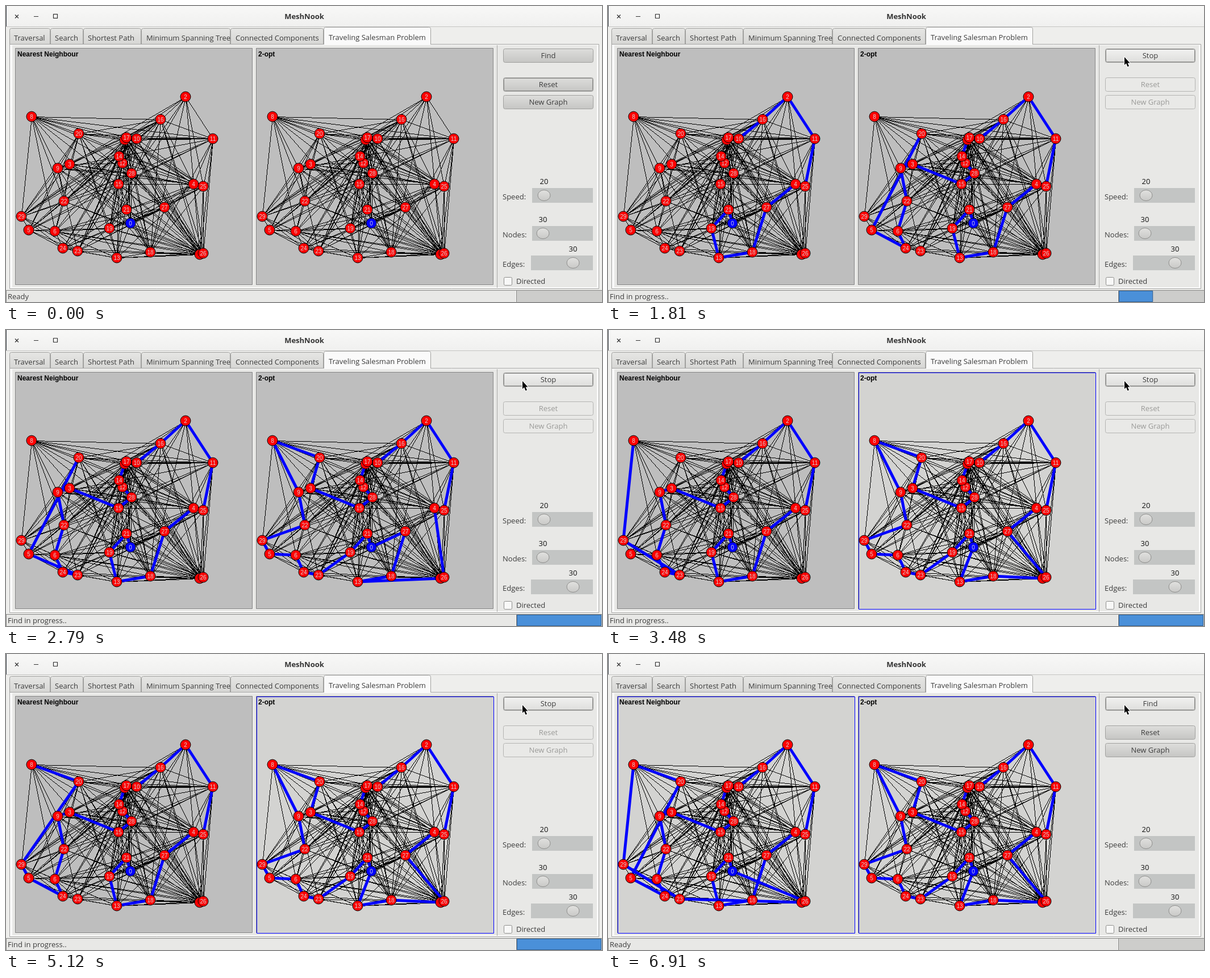
An HTML page with a canvas for the animation above (8.3 s loop, 1049x522 px).

```html
<!DOCTYPE html>
<html lang="en">
<head>
<meta charset="utf-8">
<title>Tour search</title>
<style>
html, body { margin: 0; width: 100%; height: 100%; overflow: hidden; background: #eeeeec }
canvas { display: block }
</style>
</head>
<body>
<canvas id="stage" width="1049" height="522"></canvas>
<script>
const LOOP = 8300, START = 1450, DONE = 6910, TWO_OPT_DONE = 3200;
const UI = '"Open Sans", "Noto Sans", sans-serif';
const ARIAL = '"Liberation Sans", Arial, sans-serif';
const ctx = document.getElementById('stage').getContext('2d');

// node centres, indexed by node number
const nodes = [
  [219,383],[341,438],[316,160],[112,279],[330,314],[40,395],[86,397],[209,236],[45,195],[91,286],
  [230,234],[364,234],[205,277],[195,444],[199,265],[198,314],[272,200],[212,232],[254,434],[182,392],
  [128,225],[212,359],[102,344],[126,432],[100,427],[347,318],[347,436],[279,355],[221,295],[27,371]
];
const dist = (a, b) => Math.hypot(nodes[a][0] - nodes[b][0], nodes[a][1] - nodes[b][1]);
const key = (a, b) => a < b ? a + '-' + b : b + '-' + a;

// depth-first, nearest-first search over the nodes left after a greedy start
const base = [0,21,19,13,18,27,4,25,11,2,16,10,17,7,14,12,28,15,3,9,22,6,24];
const open = [5, 20, 8, 29, 23, 1, 26];
const links = new Set('5-20 5-29 5-23 1-23 23-29 1-26 20-29 8-20 8-29 23-24 5-24 0-26'.split(' '));
const linked = (a, b) => links.has(key(a, b));
const steps = base.map((_, i) => base.slice(0, i + 1));

function visit(path) {
  const at = path[path.length - 1];
  if (path.length === nodes.length) {
    if (linked(at, 0)) steps.push([...path, 0]);
    return linked(at, 0);
  }
  const choices = open.filter(n => linked(at, n) && !path.includes(n));
  choices.sort((a, b) => dist(at, a) - dist(at, b));
  for (const n of choices) {
    const next = [...path, n];
    steps.push(next);
    if (visit(next)) return true;
    steps.push(path);
  }
  return false;
}
visit(base);

const stepOf = tail => steps.findIndex(p => p.slice(base.length).join(' ') === tail);
const pace = [
  [START, 0], [1810, 11], [2250, 22], [2790, stepOf('23 5 20')], [3940, stepOf('23 1')],
  [4310, stepOf('5')], [4820, stepOf('5 29 8')], [5120, stepOf('5 29 20 8')],
  [6320, stepOf('5 23 1') - 1], [DONE, steps.length - 1]
];

function searchPath(t) {
  if (t < START) return [];
  if (t >= DONE) return steps[steps.length - 1];
  const i = pace.findIndex(p => p[0] > t);
  const [t0, s0] = pace[i - 1], [t1, s1] = pace[i];
  return steps[Math.floor(s0 + (s1 - s0) * (t - t0) / (t1 - t0) + 1e-6)];
}

// 2-opt: each move reverses the stretch between two nodes
const flips = [[13,23],[29,24],[5,6],[29,5],[20,9],[9,29],[27,26],[26,27],[18,26],[13,18]];
const flipTimes = flips.map((_, i) => i < 7 ? 2050 + 100 * i : 2200 + 100 * i);
const tours = [[...base, ...open, 0]];
for (const [a, b] of flips) {
  const tour = tours[tours.length - 1];
  const i = tour.indexOf(a), j = tour.indexOf(b) + 1;
  tours.push([...tour.slice(0, i), ...tour.slice(i, j).reverse(), ...tour.slice(j)]);
}

function twoOptPath(t) {
  if (t < START) return [];
  const count = Math.floor(Math.floor((t - START) / 40) * 8 / 3) + 1;
  return tours[flipTimes.filter(f => t >= f).length].slice(0, count);
}

// black edges: every tour edge plus seeded random ones, densest at the hubs
function drawEdges() {
  const layer = document.createElement('canvas');
  layer.width = 430;
  layer.height = 522;
  const g = layer.getContext('2d');
  const used = new Set('11-26 1-13 13-26 13-23 1-25 25-26 8-16 11-17 7-11'.split(' '));
  for (const p of [...steps, ...tours])
    for (let i = 1; i < p.length; i++) used.add(key(p[i - 1], p[i]));
  const hubs = [1, 7, 16, 17, 26], settled = [0, 2, ...open];
  let seed = 77;
  for (let a = 0; a < nodes.length; a++)
    for (let b = a + 1; b < nodes.length; b++) {
      seed = (seed * 16807) % 2147483647;
      const density = settled.includes(a) && settled.includes(b) ? 0
        : hubs.includes(a) || hubs.includes(b) ? .75 : .45;
      if (!used.has(key(a, b)) && seed / 2147483647 > density) continue;
      const [x, y] = nodes[a], dx = nodes[b][0] - x, dy = nodes[b][1] - y;
      const n = Math.max(Math.abs(dx), Math.abs(dy));
      for (let i = 0; i <= n; i++)
        g.fillRect(Math.round(x + dx * i / n), Math.round(y + dy * i / n), 1, 1);
    }
  return layer;
}
const edges = drawEdges();

function box(x, y, w, h, fill, stroke, r = 0) {
  ctx.beginPath();
  ctx.roundRect(x + .5, y + .5, w - 1, h - 1, r);
  ctx.fillStyle = fill;
  ctx.fill();
  if (stroke) {
    ctx.strokeStyle = stroke;
    ctx.lineWidth = 1;
    ctx.stroke();
  }
}
function rect(x, y, w, h, fill) {
  ctx.fillStyle = fill;
  ctx.fillRect(x, y, w, h);
}
function text(s, x, y, color = '#3c3c3c', font = '13px ' + UI, align = 'left') {
  ctx.font = font;
  ctx.textAlign = align;
  ctx.fillStyle = color;
  ctx.fillText(s, x, y);
}
function shade(y, h, top, bottom) {
  const g = ctx.createLinearGradient(0, y, 0, y + h);
  g.addColorStop(0, top);
  g.addColorStop(1, bottom);
  return g;
}

function drawWindow() {
  rect(0, 0, 1049, 522, '#eeeeec');
  rect(0, 0, 1049, 36, shade(0, 36, '#f8f8f7', '#f0f0ef'));
  rect(0, 0, 1, 36, '#3a4048');
  rect(0, 36, 1049, 1, '#c4c4c2');
  text('MeshNook', 525, 23, '#333', 'bold 13px ' + UI, 'center');
  ctx.strokeStyle = '#333';
  ctx.lineWidth = 1.2;
  ctx.beginPath();
  ctx.moveTo(16, 15.5); ctx.lineTo(22, 21.5);
  ctx.moveTo(22, 15.5); ctx.lineTo(16, 21.5);
  ctx.moveTo(49, 18.5); ctx.lineTo(57, 18.5);
  ctx.stroke();
  ctx.strokeRect(83.5, 14.5, 7, 7);

  box(6, 67, 1038, 432, '#fafafa', '#a4a4a2');
  rect(11, 69, 1029, 427, '#e8e8e6');
  const tabs = [
    ['Traversal', 6, 14], ['Search', 78, 86], ['Shortest Path', 136, 144], ['Minimum Spanning Tree', 238, 247],
    ['Connected Components', 395, 404], ['Traveling Salesman Problem', 559, 568]
  ];
  tabs.forEach(([, x], i) => {
    const active = i === 5, w = active ? 189 : tabs[i + 1][1] - x;
    const y = active ? 37 : 39;
    box(x, y, w, 68 - y, active ? '#fafafa' : shade(39, 29, '#e6e6e4', '#d6d6d4'), '#a0a09e', [3, 3, 0, 0]);
    if (active) rect(x + 1, 66, w - 2, 3, '#fafafa');
  });
  tabs.forEach(([name, , x], i) => text(name, x, i === 5 ? 60 : 61));
  rect(864, 69, 1, 428, '#a8a8a6');
}

function button(label, y, { focus, disabled, hover }) {
  const fill = disabled ? '#e9e9e7' : hover ? shade(y, 24, '#f2f2f1', '#dededc') : shade(y, 24, '#dededc', '#c6c6c4');
  box(875, y, 159, 25, fill, disabled ? '#b4b4b2' : '#a0a09e', 3);
  if (focus) box(876, y + 1, 157, 23, 'transparent', '#8c8c8a', 2);
  text(label, 954.5, y + 17, disabled ? '#9a9a98' : '#3c3c3c', undefined, 'center');
}

function slider(label, value, x, y, knob) {
  text(label, 874, y + 20);
  text(value, knob, y - 7, '#111', undefined, 'center');
  rect(x, y, 1033 - x, 26, '#c3c5c4');
  ctx.beginPath();
  ctx.ellipse(knob, y + 13, 11, 9.5, 0, 0, 7);
  ctx.fillStyle = shade(y + 3, 20, '#e2e2e0', '#c8c8c6');
  ctx.fill();
  ctx.strokeStyle = '#8e8e8c';
  ctx.lineWidth = 1;
  ctx.stroke();
}

function graph(name, left, path, finished) {
  box(left, 74, 419, 419, '#f6f6f5');
  box(left, 74, 418, 418, '#bebebe', '#858585');
  if (finished) box(left + 1, 75, 418, 418, '#d3d3d1', '#0000ff');
  text(name, left + 4, 89, '#000', 'bold 12px ' + ARIAL);
  ctx.save();
  ctx.translate(left - 16, 0);
  ctx.drawImage(edges, 0, 0);
  ctx.beginPath();
  for (const n of path) ctx.lineTo(...nodes[n]);
  ctx.strokeStyle = '#0000ff';
  ctx.lineWidth = 5;
  ctx.lineJoin = 'bevel';
  ctx.stroke();
  ctx.lineWidth = 1;
  ctx.strokeStyle = '#000';
  nodes.forEach(([x, y], n) => {
    ctx.beginPath();
    ctx.arc(x, y, 9, 0, 7);
    ctx.fillStyle = n ? '#ff0000' : '#0000ff';
    ctx.fill();
    ctx.stroke();
    text(n, x, y + 3.5, '#d8d8d8', '10px ' + ARIAL, 'center');
  });
  ctx.restore();
}

function cursor(x, y) {
  const outline = [[0,0],[0,14],[3,11],[5.5,17],[8,16],[5.5,10.5],[9.5,10.5]];
  ctx.beginPath();
  for (const [dx, dy] of outline) ctx.lineTo(x + dx, y + dy);
  ctx.closePath();
  ctx.lineJoin = 'round';
  ctx.lineWidth = 2;
  ctx.strokeStyle = '#fff';
  ctx.stroke();
  ctx.fillStyle = '#000';
  ctx.fill();
}

function draw(t) {
  const busy = t >= START && t < DONE, clicked = t >= 830;
  const move = Math.min(1, Math.max(0, (t - 240) / 560));
  const ease = 1 - (1 - move) ** 2;
  const px = 846 + 63 * ease, py = 37 + 53 * ease;

  drawWindow();
  graph('Nearest Neighbour', 16, searchPath(t), t >= DONE);
  graph('2-opt', 440, twoOptPath(t), t >= TWO_OPT_DONE);

  button(busy ? 'Stop' : 'Find', 75, { focus: clicked, hover: t >= 240 && px > 875 && py > 75 });
  button('Reset', 126, { focus: !clicked, disabled: busy });
  button('New Graph', 157, { disabled: busy });
  slider('Speed:', '20', 926, 321, 947);
  slider('Nodes:', '30', 926, 388, 945);
  slider('Edges:', '30', 924, 440, 998);
  box(876, 478, 15, 15, '#f8f8f7', '#8e8e8c', 2);
  text('Directed', 898, 490);

  rect(0, 501, 1049, 21, '#e8e8e6');
  rect(0, 501, 1049, 1, '#858583');
  rect(0, 502, 1, 20, '#858583');
  rect(897, 502, 1, 20, '#fafafa');
  rect(898, 502, 1, 20, '#858583');
  text(busy ? 'Find in progress..' : 'Ready', 3, 517);
  rect(899, 502, 150, 20, '#cdcdcb');
  if (busy) {
    const w = Math.min(149, (t - START) * .164 + 1);
    if (w > 2) box(899, 502, w, 20, '#4a90d9', '#2f5f92');
  }
  if (t >= 240) cursor(px, py);
}

function tick(now) {
  draw(now % LOOP);
  requestAnimationFrame(tick);
}
requestAnimationFrame(tick);
</script>
</body>
</html>
```
